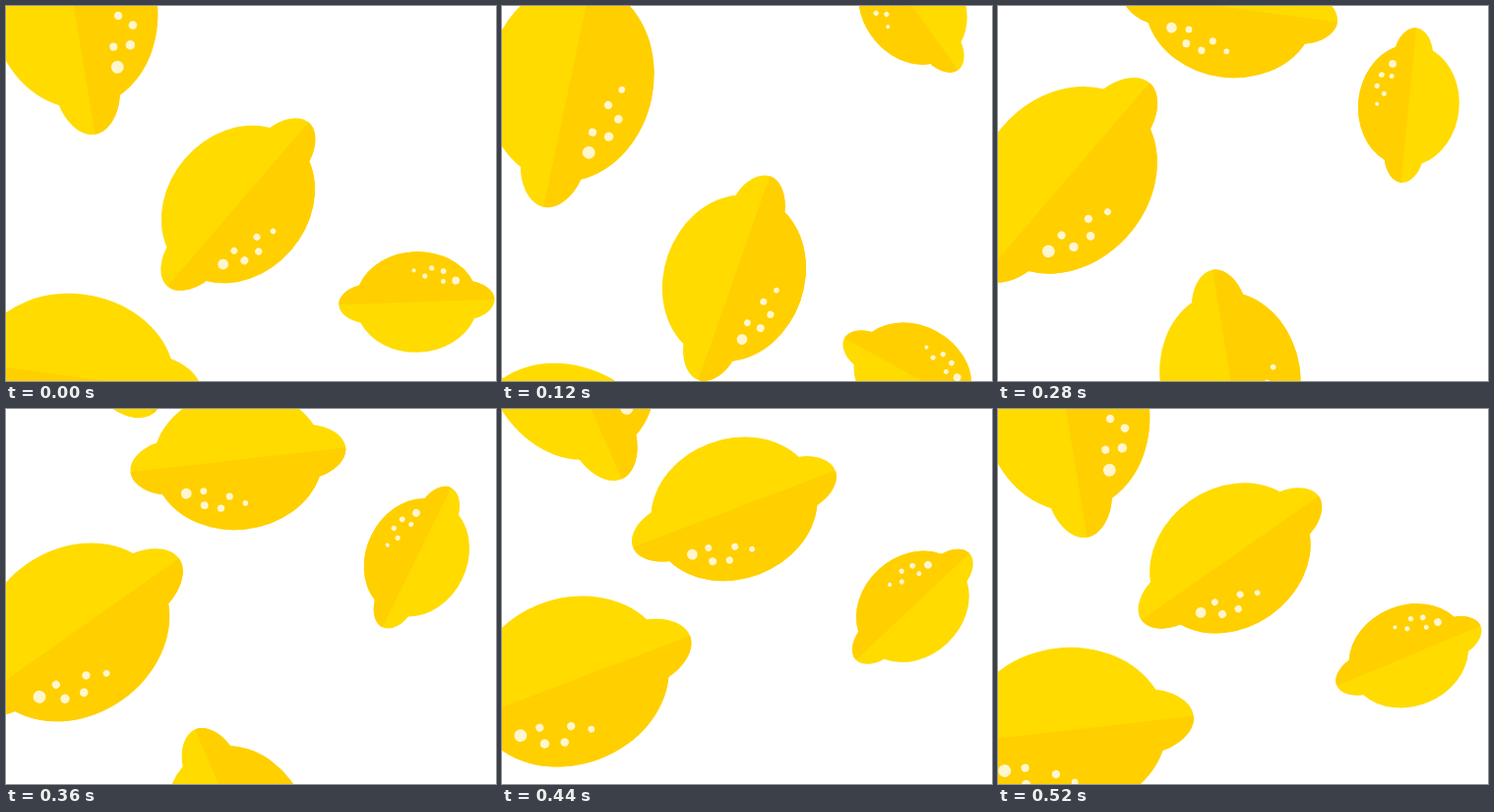
An HTML page with a canvas for the animation above (0.56 s loop, 498 px wide and 382 px high).

```html
<!DOCTYPE html>
<html lang="en">
<head>
<meta charset="utf-8">
<title>Falling lemons</title>
<style>
  html, body { margin: 0; width: 100%; height: 100%; overflow: hidden; background: #fff; }
  canvas { display: block; }
</style>
</head>
<body>
<canvas id="stage" width="498" height="382"></canvas>
<script>
const ctx = document.getElementById('stage').getContext('2d');
const STEP_MS = 40, STEPS = 14, FALL = 25.05;

// Lemon outline in units of half its length, lying along the x axis.
const lower = 'M-1 0C-1 .115-.87 .21-.73 .24A.786 .648 0 0 0 .73 .24C.87 .21 1 .115 1 0';
const upper = 'C1-.115 .87-.21 .73-.24A.786 .648 0 0 0-.73-.24C-.87-.21-1-.115-1 0Z';
const whole = new Path2D(lower + upper);
const shade = new Path2D(lower + 'Z');

// x, y, radius
const spots = [
  [-.511, .257, .049], [-.35, .253, .031], [-.357, .384, .036],
  [-.208, .429, .033], [-.117, .329, .032], [.022, .407, .026]
];

// Each column: position and angle at step 0, turn per step,
// and the step offsets of the lemons that share the column.
const columns = [
  { x: 69.2, y: 2, size: 130.5, angle: -99.5, turn: 7.15, offsets: [0, 15, -13] },
  { x: 235.9, y: 202, size: 110, angle: -49.3, turn: -7.13, offsets: [0, -15] },
  { x: 417.4, y: 301.5, size: 79.2, angle: 178, turn: 10.3, offsets: [0, -15] }
];

function drawLemon(col, step) {
  ctx.save();
  ctx.translate(col.x, col.y + FALL * step);
  ctx.rotate((col.angle + col.turn * step) * Math.PI / 180);
  ctx.scale(col.size, col.size);
  ctx.fillStyle = '#ffdb00';
  ctx.fill(whole);
  ctx.fillStyle = '#ffcf00';
  ctx.fill(shade);
  ctx.fillStyle = '#fff6cf';
  for (const [x, y, r] of spots) {
    ctx.beginPath();
    ctx.arc(x, y, r, 0, 2 * Math.PI);
    ctx.fill();
  }
  ctx.restore();
}

function render(now) {
  const step = Math.floor(now / STEP_MS) % STEPS;
  ctx.fillStyle = '#fff';
  ctx.fillRect(0, 0, 498, 382);
  for (const col of columns) {
    for (const offset of col.offsets) drawLemon(col, step + offset);
  }
}

const start = performance.now();
function tick() {
  render(performance.now() - start);
  requestAnimationFrame(tick);
}
tick();
</script>
</body>
</html>
```
